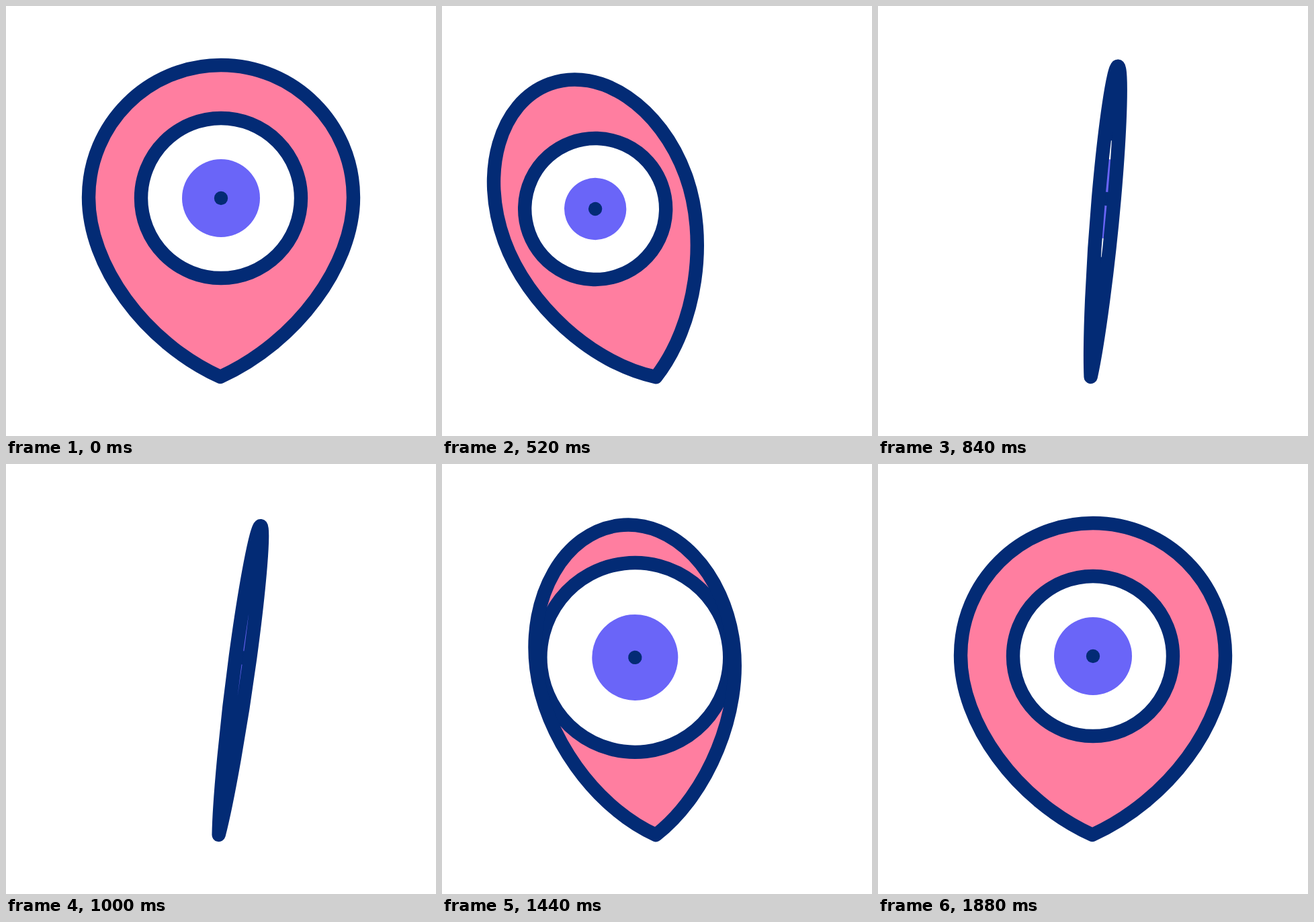
An HTML page that plays this animation: 640 px wide and 640 px high, repeating every 2000 ms.

```html
<!DOCTYPE html>
<html lang="en">
<head>
<meta charset="utf-8">
<title>Turning map pin</title>
<style>
  html, body { margin: 0; width: 100%; height: 100%; overflow: hidden; background: #fff; }
  svg { display: block; width: 100vw; height: 100vh; }
  .line { stroke: #032b75; stroke-width: 20.4; stroke-linejoin: round; }
</style>
</head>
<body>
<svg viewBox="0 0 640 640">
  <clipPath id="inside"><path class="shape"/></clipPath>
  <g id="pin">
    <path class="shape" fill="#ff7ea0"/>
    <g clip-path="url(#inside)">
      <circle id="eye" class="line" cy="-266" fill="#fff"/>
      <circle id="iris" cy="-266" fill="#6a65f8"/>
      <circle cy="-266" r="10.2" fill="#032b75"/>
    </g>
    <path class="shape line" fill="none"/>
  </g>
</svg>
<script>
const LOOP = 2000, STEP = 40, TURN = 1880;

// Easing curve with handles (x1, 0) and (x2, 1); the defaults give a smoothstep.
function ease(p, x1 = 1 / 3, x2 = 2 / 3) {
  let low = 0, high = 1;
  for (let i = 0; i < 24; i++) {
    const u = (low + high) / 2, v = 1 - u;
    if (3 * v * v * u * x1 + 3 * v * u * u * x2 + u * u * u < p) low = u;
    else high = u;
  }
  return low * low * (3 - 2 * low);
}

// Eased change from one value to the next between two times.
function move(time, from, to, start, end, ...handles) {
  const p = Math.min(1, Math.max(0, (time - start) / (end - start)));
  return from + (to - from) * ease(p, ...handles);
}

// The pin turns edge-on at half time, then opens again.
function width(time) {
  return time < TURN / 2
    ? move(time, 1, 0, 0, TURN / 2, .78, .72)
    : move(time, 0, 1, TURN / 2, TURN, .12, .45);
}

// It rocks through four equal swings.
function tilt(time) {
  const poses = [0, 20.9, -8.4, 6.95, 0], swing = TURN / 4;
  const i = Math.min(3, Math.floor(time / swing));
  return move(time, poses[i], poses[i + 1], i * swing, (i + 1) * swing);
}

// A circle shrinks, swells past its rest size and settles.
function pulse(time, rest, small, large, start, low, high) {
  if (time < low) return move(time, rest, small, start, low);
  if (time < high) return move(time, small, large, low, high);
  return move(time, large, rest, high, TURN);
}

// Outline with the foot of its axis at the origin, narrowed to scale s.
function outline(s) {
  const at = (x, y) => `${(x * s).toFixed(2)} ${y}`;
  return `M${at(-1, 0)}C${at(-115, -52)} ${at(-197, -167)} ${at(-197, -267)}`
    + `C${at(-197, -376)} ${at(-109, -464)} ${at(0, -464)}`
    + `C${at(109, -464)} ${at(197, -376)} ${at(197, -267)}`
    + `C${at(197, -167)} ${at(113, -52)} ${at(-1, 0)}Z`;
}

const pin = document.getElementById('pin');
const eye = document.getElementById('eye');
const iris = document.getElementById('iris');
const shapes = document.querySelectorAll('.shape');

function draw(time) {
  const s = width(time), d = outline(s);
  shapes.forEach(shape => shape.setAttribute('d', d));
  pin.setAttribute('transform', `translate(${320 - 3.5 * (1 - s)} 552) rotate(${-tilt(time)})`);
  eye.setAttribute('r', pulse(time, 119, 91, 152, 280, 760, 1160));
  iris.setAttribute('r', pulse(time, 58, 43.5, 70, 200, 640, 1000));
}

const start = performance.now();
function tick() {
  const time = (performance.now() - start) % LOOP;
  draw(Math.floor(time / STEP) * STEP);
  requestAnimationFrame(tick);
}
tick();
</script>
</body>
</html>
```
